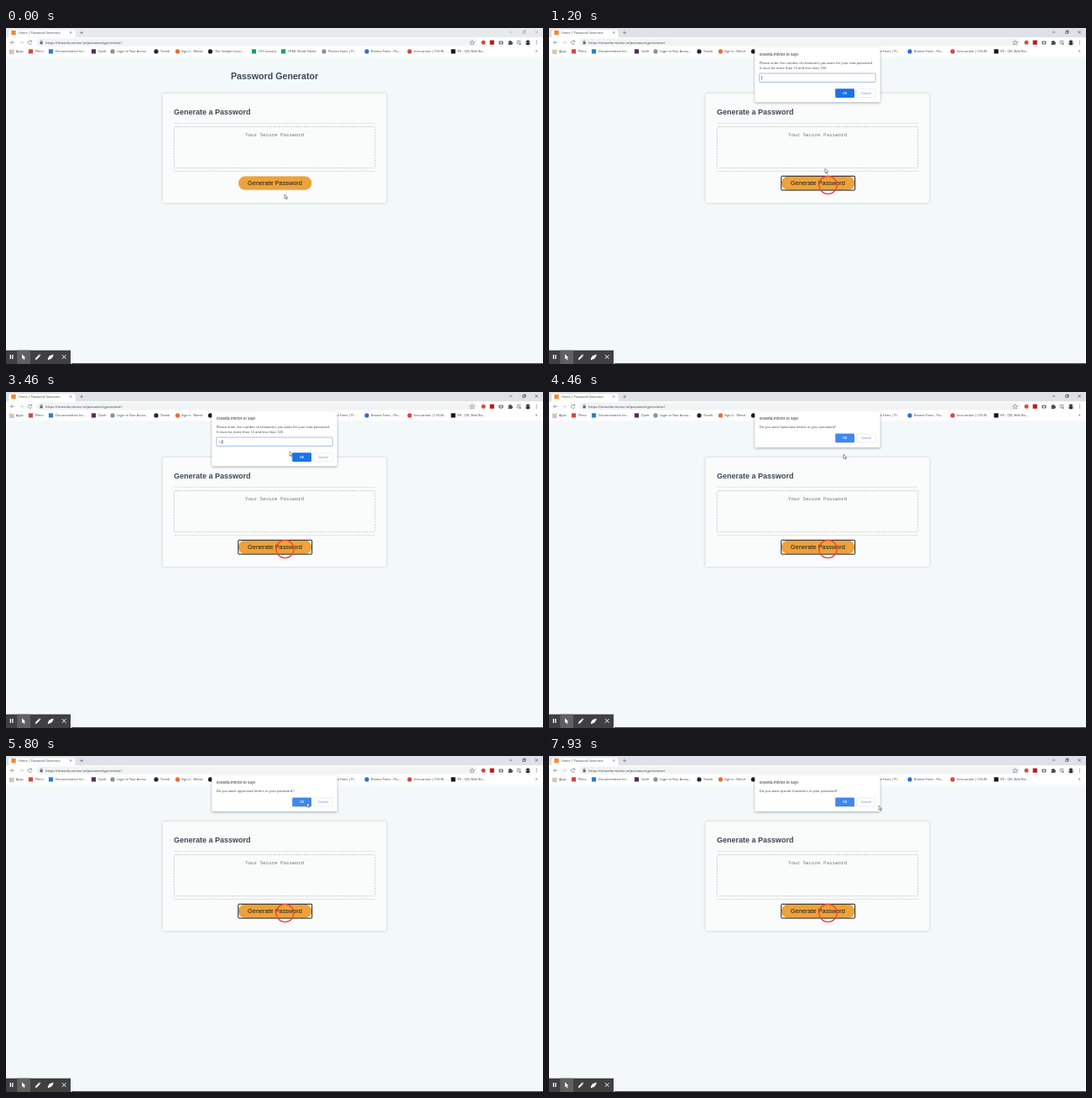
Recreate the animation shown at these times as an HTML page. Size 640x400 px, loop 8000 ms.

```html
<!DOCTYPE html>
<html lang="en">
<head>
<meta charset="utf-8">
<title>Password Generator</title>
<style>
html, body { margin: 0; width: 100%; height: 100%; overflow: hidden; background: #f3f9fa; }
svg { display: block; width: 640px; height: 400px; }
text { white-space: pre; }
.ui { font-family: "Open Sans", "Noto Sans", sans-serif; font-size: 3.72px; fill: #3c4043; }
.page { font-family: "Liberation Sans", Arial, sans-serif; fill: #3b4954; }
.mono { font-family: "Noto Sans Mono", "DejaVu Sans Mono", monospace; font-size: 5.85px; fill: #757575; }
.line { fill: none; stroke: #5f6368; stroke-width: .6; }
.white { fill: none; stroke: #fff; stroke-width: 1; }
.shadow { filter: drop-shadow(0 .8px 1.5px rgba(0, 0, 0, .2)); }
.lift { filter: drop-shadow(0 1px 1.6px rgba(0, 0, 0, .32)); }
</style>
</head>
<body>
<svg id="stage" viewBox="0 0 640 400" xmlns="http://www.w3.org/2000/svg">
  <rect width="640" height="400" fill="#f3f9fa"/>

  <g id="browser" class="ui">
    <rect id="strip" width="640" height="11.3"/>
    <path d="M1.5 11.3Q3.5 11.3 3.5 9V4Q3.5 2 5.5 2H80.500Q82.500 2 82.500 4V9Q82.500 11.300 84.500 11.300Z" fill="#fff"/>
    <rect x="6.300" y="2.900" width="5.400" height="5.400" fill="#ee8a35"/>
    <text x="15" y="7">Home | Password Generator</text>
    <path class="line" d="M75.800 4.200l2.600 2.600m0-2.600l-2.600 2.600M88.200 5.500h3.800M90.100 3.600v3.800"/>
    <g id="controls" fill="none" stroke-width=".6">
      <path d="M599.800 5h3.400M615.800 3.900h2.600v2.600h-2.600zM616.600 3.900v-.8h2.600v2.600h-.8M630.600 3.300l3.300 3.300m0-3.300l-3.300 3.300"/>
    </g>
    <rect y="11.300" width="640" height="22.900" fill="#fff"/>
    <rect x="36" y="12.600" width="525.500" height="9" rx="4.500" fill="#f1f3f4"/>
    <path class="line" d="M10 17.200H5.500m2-2l-2 2 2 2"/>
    <path class="line" d="M16 17.200h4.500m-2-2l2 2-2 2" style="stroke:#b9bcc0"/>
    <path class="line" d="M30.300 15.800a2.200 2.200 0 1 0 .4 2M30.700 14.600v1.700h-1.700"/>
    <rect x="40.500" y="16.500" width="3.200" height="2.700" rx=".3" fill="#5f6368"/>
    <path class="line" d="M41.200 16.700v-.9a.9.900 0 0 1 1.800 0v.9"/>
    <text x="47" y="18.700" style="font-size:4.270px">https://oravela.mivtor.io/password-generator/</text>
    <path class="line" d="M555.500 14.600l.8 1.800 2 .2-1.500 1.300.5 2-1.800-1.100-1.800 1.100.5-2-1.500-1.300 2-.2z" style="stroke-width:.5"/>
    <circle cx="569" cy="17.200" r="2.500" fill="#df4a45"/>
    <rect x="576.600" y="14.600" width="5.200" height="5.200" fill="#b51f1b"/>
    <rect x="587.400" y="15.600" width="5.200" height="3.800" rx=".7" fill="#757b80"/>
    <circle cx="590" cy="17.500" r="1.100" fill="#fff"/>
    <path d="M598.600 15.700h1.500a.9.900 0 0 1 1.800 0h1.300v1.400a.9.900 0 0 1 0 1.800v1h-4.600v-1.200a.9.900 0 0 0 0-1.600z" fill="#4b4f53"/>
    <path class="line" d="M608.600 15.300h5M608.600 17h5M608.600 18.700h2.400"/>
    <path d="M611.800 17.700l2.400 1.300-2.400 1.300z" fill="#5f6368"/>
    <circle cx="622" cy="17.200" r="3.300" fill="#c9ccd0"/>
    <path d="M619.500 19.300q.3-1.500 1.500-1.700a1.700 1.700 0 1 1 2 0q1.200.2 1.500 1.700a3.300 3.300 0 0 1-5 0z" fill="#2f3336"/>
    <g fill="#5f6368"><circle cx="632.500" cy="15.300" r=".5"/><circle cx="632.500" cy="17.200" r=".5"/><circle cx="632.500" cy="19.100" r=".5"/></g>
    <g id="bookmarks"></g>
    <text x="631" y="29.300" style="font-size:5px">»</text>
  </g>

  <g class="page" text-anchor="middle">
    <text x="320" y="61" font-size="10.667" font-weight="700">Password Generator</text>
    <rect class="shadow" x="186.700" y="78" width="266.600" height="130" rx="1.500" fill="#fafbfb"/>
    <text x="200" y="103.100" font-size="9" font-weight="700" text-anchor="start">Generate a Password</text>
    <path d="M200 113.300h240M200 170.500h240" stroke="#d2d5d7" stroke-width=".6"/>
    <rect x="200.300" y="117.500" width="239.400" height="49.200" rx="1.500" fill="none" stroke="#b9bcbe" stroke-width=".75" stroke-dasharray="2 1.330"/>
    <text class="mono" x="320" y="128.700">Your Secure Password</text>
    <rect x="277" y="176.500" width="87.300" height="16.300" rx="8.150" fill="#eda23b" class="button"/>
    <text x="320.500" y="187.200" font-size="7.333" style="fill:#1c1c1c">Generate Password</text>
    <rect id="focus" x="276.800" y="176.300" width="87.900" height="16.800" rx=".8" fill="none" stroke="#1a1a1a" stroke-width="1"/>
  </g>
  <circle id="ring" cx="332.500" cy="187" fill="none" stroke="#f04438" stroke-width="1.200"/>

  <g id="dialog" class="ui">
    <rect id="panel" class="lift" x="245.300" y="23" width="149.400" rx="1.300" fill="#fff"/>
    <text x="250.800" y="33.200" style="font-size:4.590px;fill:#202124">oravela.mivtor.io says</text>
    <g style="font-size:4.030px">
      <text id="line1" x="250.800" y="42.500"></text>
      <text id="line2" x="250.800" y="49.200">It must be more than 12 and less than 128.</text>
    </g>
    <g id="field">
      <rect x="250.800" y="54" width="138.400" height="10.400" rx=".8" fill="#fff" stroke="#8dafdd" stroke-width=".8"/>
      <text id="typed" x="253.700" y="60.600" style="font-size:3.900px"></text>
      <path id="caret" d="M0 56.800v4.800" stroke="#202124" stroke-width=".5"/>
    </g>
    <g id="buttons" text-anchor="middle" font-weight="600" style="font-size:3.700px">
      <rect id="ok" x="341.200" y="0" width="22.800" height="10.700" rx="1.200"/>
      <text x="352.600" y="6.700" style="fill:#fff">OK</text>
      <rect x="366.900" y=".2" width="22.300" height="10.300" rx="1.200" fill="#fff" stroke="#dadce0" stroke-width=".5"/>
      <text x="378" y="6.700" style="fill:#3b78d8;font-weight:400">Cancel</text>
    </g>
  </g>

  <g id="recorder">
    <path d="M78 399.500h562" stroke="#36393b" stroke-width=".9"/>
    <rect y="383.700" width="77" height="16.300" fill="#404040"/>
    <rect x="13.300" y="383.700" width="15.700" height="16.300" fill="#606060"/>
    <path class="white" d="M5.400 389v5M7.900 389v5" style="stroke-width:1.300"/>
    <path d="M19 388.300v6l1.400-1.200 1 2.200 1-.4-1-2.200h1.900z" fill="#fff"/>
    <path d="M34.800 394.900l.5-2 3.600-3.600 1.500 1.500-3.600 3.600zM39.300 388.900l.6-.6 1.500 1.500-.6.600z" fill="#fff"/>
    <path d="M49.800 393.400l2-3.100 4.800-1.800-.5 2.600-2.100 2.700-4 1.400z" fill="#fff"/>
    <path class="white" d="M66.900 389.200l4.600 4.600m0-4.600l-4.600 4.600"/>
  </g>

  <g id="pointer" fill="#fff" stroke="#222" stroke-width=".45" stroke-linejoin="round">
    <path id="arrow" d="M0 0V5.200L1.200 4.100 2.100 6.100 3 5.700 2.100 3.800H3.800Z"/>
    <path id="hand" d="M-.6 .4a.6.600 0 0 1 1.200 0V2.500l2.200.6q.7.200.6 1L3 6.500H-.2L-2 4.100q.3-.9 1.400 0z"/>
  </g>
</svg>
<script>
const LOOP = 8000, FADE = 110;
const $ = id => document.getElementById(id);
const set = (id, attrs) => {
  for (const key in attrs) $(id).setAttribute(key, attrs[key]);
};
const show = (id, on) => set(id, { visibility: on ? "inherit" : "hidden" });
const clamp = v => Math.min(1, Math.max(0, v));
const ease = v => v * v * (3 - 2 * v);

// icon x, text x, label, icon colour, round icon
const bookmarks = [
  [29.5, 35, "Plimo", "#d9473c"],
  [53.5, 59, "Documentation for...", "#2680c9"],
  [104.5, 110, "Quelt", "#5b2a60"],
  [127, 132, "Login to Your Accou...", "#7f9a8c", 1],
  [179, 184, "Tovrek", "#24292e", 1],
  [204.5, 209, "Sign in · Morvit", "#ee6a35", 1],
  [243.5, 249, "The Sample Lesso...", "#1d1d1d", 1],
  [295.5, 301, "CSS Lessons", "#17a35f"],
  [330.5, 336, "HTML Shade Tables", "#17a35f"],
  [379, 384, "Plumex Fonts | Pl...", "#8a8f94", 1],
  [430, 435, "Browse Fonts - Plu...", "#2a6fd6", 1],
  [481, 486, "font-variant | CSS-W...", "#d8433f", 1],
  [533, 538, "IFE - QVL Web No...", "#151515"]
];
const appColors = ["#e24a3d", "#e9a23a", "#3d9e56", "#4a84df"];
let marks = "";
for (let i = 0; i < 9; i++) {
  const x = 4.4 + i % 3 * 1.8, y = 26 + Math.floor(i / 3) * 1.8;
  marks += `<rect x="${x}" y="${y}" width="1.2" height="1.2" fill="${appColors[i % 4]}"/>`;
}
marks += '<text x="12" y="29.3">Apps</text>';
for (const [x, textX, label, color, round] of bookmarks) {
  marks += `<rect x="${x - 2.6}" y="25.3" width="5.2" height="5.2" rx="${round ? 2.6 : 0}" fill="${color}"/>`;
  marks += `<text x="${textX}" y="29.3">${label}</text>`;
}
$("bookmarks").innerHTML = marks;

const question = kind => `Do you want ${kind} in your password?`;
const dialogs = [
  { from: 800, to: 3860, text: "Please enter the number of characters you want for your new password.", prompt: true },
  { from: 4000, to: 4930, text: question("lowercase letters") },
  { from: 5130, to: 5930, text: question("uppercase letters") },
  { from: 6130, to: 6930, text: question("numbers") },
  { from: 7080, to: 9000, text: question("special characters") }
];

const route = [
  [60, 332, 198], [430, 332, 185], [930, 332, 185], [1200, 329, 167.5],
  [1730, 338, 71], [3460, 338, 71], [3760, 351, 74], [4460, 351, 74],
  [4800, 358.5, 55.5], [5800, 358.5, 55.5], [6350, 360, 54], [7150, 360, 54],
  [7660, 393, 59]
];

function pointerAt(t) {
  const next = route.findIndex(p => p[0] > t);
  if (next < 0) return route[route.length - 1].slice(1);
  if (next === 0) return route[0].slice(1);
  const [t0, x0, y0] = route[next - 1], [t1, x1, y1] = route[next];
  const k = ease((t - t0) / (t1 - t0));
  return [x0 + (x1 - x0) * k, y0 + (y1 - y0) * k];
}

function drawDialog(t) {
  const d = dialogs.find(d => t >= d.from && t < d.to + FADE);
  show("dialog", d);
  if (!d) return;
  const opacity = Math.min(clamp((t - d.from) / FADE), clamp((d.to + FADE - t) / FADE));
  set("dialog", { opacity });
  set("panel", { height: d.prompt ? 65.3 : 43 });
  $("line1").textContent = d.text;
  show("line2", d.prompt);
  show("field", d.prompt);
  set("buttons", { transform: `translate(0 ${d.prompt ? 72.2 : 49.6})` });
  set("ok", { fill: d.prompt ? "#1a73e8" : "#4088ec" });

  const typed = t < 3000 ? "" : t < 3200 ? "1" : "12";
  const lastKey = t < 3000 ? 860 : t < 3200 ? 3000 : 3200;
  $("typed").textContent = typed;
  set("caret", { transform: `translate(${253.6 + typed.length * 2.25} 0)` });
  show("caret", d.prompt && (t < lastKey || (t - lastKey) % 1000 < 500));
}

function draw(t) {
  const focused = t >= 500;
  set("strip", { fill: focused ? "#dee1e6" : "#e7eaed" });
  set("controls", { stroke: focused ? "#333" : "#9a9da1" });
  show("focus", focused);
  show("ring", focused);
  set("ring", { r: 4 + 6.6 * ease(clamp((t - 500) / 300)) });
  drawDialog(t);

  const [x, y] = pointerAt(t);
  const overButton = t < 930 && y < 192;
  set("pointer", { transform: `translate(${x} ${y})` });
  show("hand", overButton);
  show("arrow", !overButton);
}

const start = performance.now();
function tick() {
  draw((performance.now() - start) % LOOP);
  requestAnimationFrame(tick);
}
tick();
</script>
</body>
</html>
```
